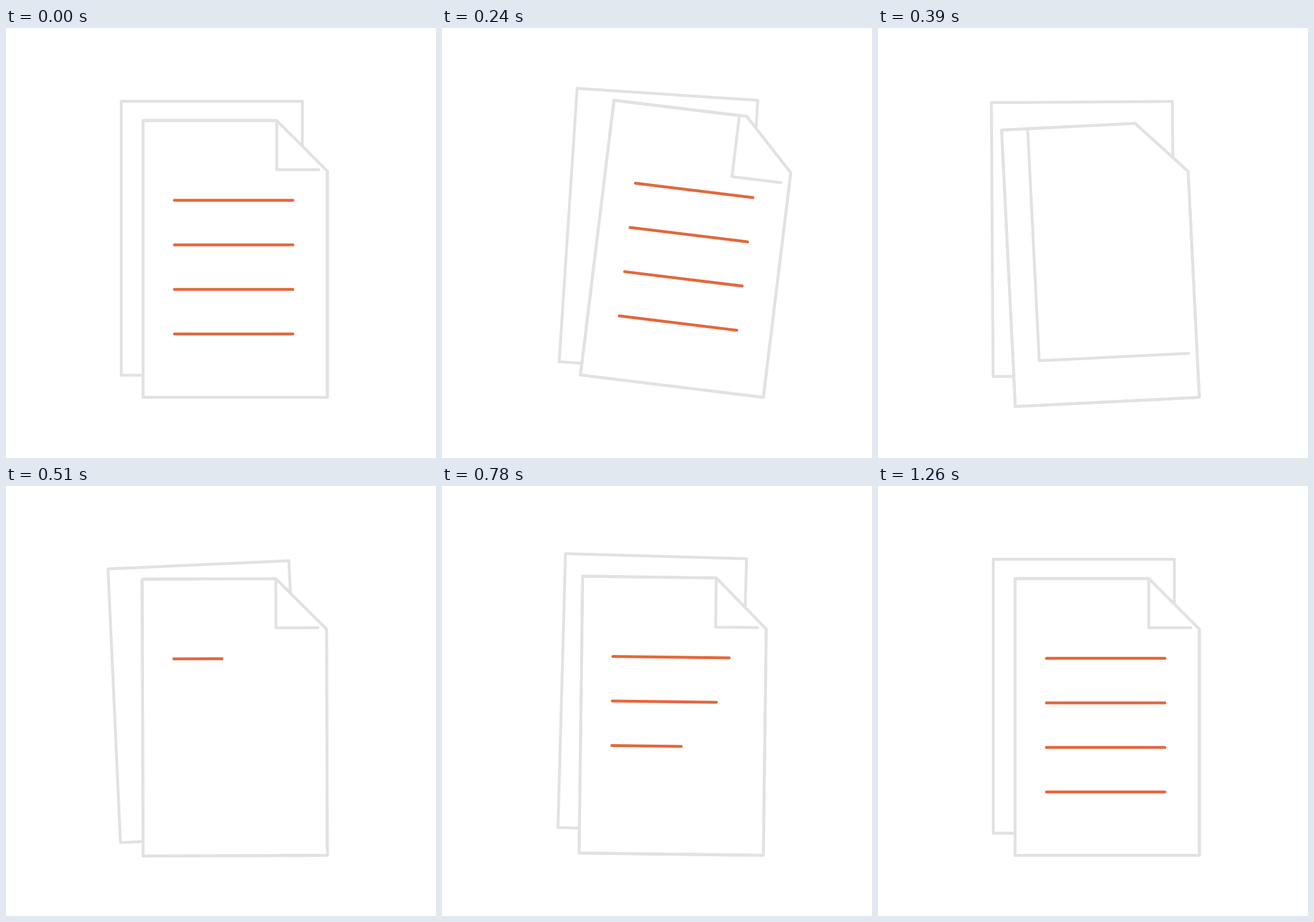
These frames come from a looping animation (748x748 px, 3450 ms). An HTML page:

```html
<!DOCTYPE html>
<html lang="en">
<head>
<meta charset="utf-8">
<title>Turning pages</title>
<style>
  html, body { margin: 0; height: 100%; overflow: hidden; background: #fff; }
  svg { display: block; width: 100vw; height: 100vh; }
  path { fill: #fff; stroke: #e2e2e2; stroke-width: 5; stroke-linecap: round; stroke-linejoin: round; }
  #lines path { stroke: #e5673a; }
</style>
</head>
<body>
<svg viewBox="0 0 748 748">
  <path id="back" d="M200.5 127.5H515.5V604H200.5Z"/>
  <g id="front">
    <path d="M238.5 161H471L559 249V642.5H238.5Z"/>
    <g id="lines"><path/><path/><path/><path/></g>
    <path id="flap" stroke="none" style="stroke:none"/>
    <path id="crease" style="fill:none"/>
    <path d="M471 161L559 249V642.5H238.5V161Z" style="fill:none"/>
  </g>
</svg>
<script>
const LOOP = 3450, STEP = 30;
const $ = id => document.getElementById(id);
const lines = [...$('lines').children];

// [time in ms, degrees]
const frontSwing = [[0, 0], [228, 7.1], [400, -2.95], [605, 2], [900, 0]];
const backSwing = [[40, 0], [275, 4], [470, -2.9], [735, 1.9], [908, 0]];
const TURN_START = 203, TURN_END = 464;
const WRITE_START = 440, WRITE_GAP = 114, WRITE_TIME = 490;

const clamp = u => Math.min(1, Math.max(0, u));
const smooth = u => u * u * (3 - 2 * u);
const mix = (a, b, u) => a + (b - a) * u;
const progress = (t, a, b) => clamp((t - a) / (b - a));

function swing(keys, t) {
  let angle = keys[0][1];
  for (let i = 1; i < keys.length; i++) {
    angle = mix(angle, keys[i][1], smooth(progress(t, keys[i - 1][0], keys[i][0])));
  }
  return angle;
}

function rotate(el, angle) {
  el.setAttribute('transform', `rotate(${angle} 559.5 642.5)`);
}

function draw(t) {
  rotate($('back'), swing(backSwing, t));
  rotate($('front'), swing(frontSwing, t));

  // The folded corner sweeps to the opposite corner, then starts afresh.
  const turn = t < TURN_END ? smooth(progress(t, TURN_START, TURN_END)) : 0;
  const x = mix(471, 238.5, turn), y = mix(246.5, 642.5, turn);
  const crease = `M${x} 161V${y}H544`;
  $('crease').setAttribute('d', crease);
  $('flap').setAttribute('d', crease + 'L559 249L471 161Z');

  lines.forEach((line, i) => {
    const start = WRITE_START + i * WRITE_GAP;
    const u = t < WRITE_START ? 1 : progress(t, start, start + WRITE_TIME);
    const length = 206 * (1 - (1 - u) ** 3.4);
    line.setAttribute('d', u > 0 ? `M293 ${299.8 + i * 77.5}h${length}` : '');
  });
}

function tick() {
  const t = performance.now() % LOOP;
  draw(Math.floor(t / STEP) * STEP);
  requestAnimationFrame(tick);
}
tick();
</script>
</body>
</html>
```
